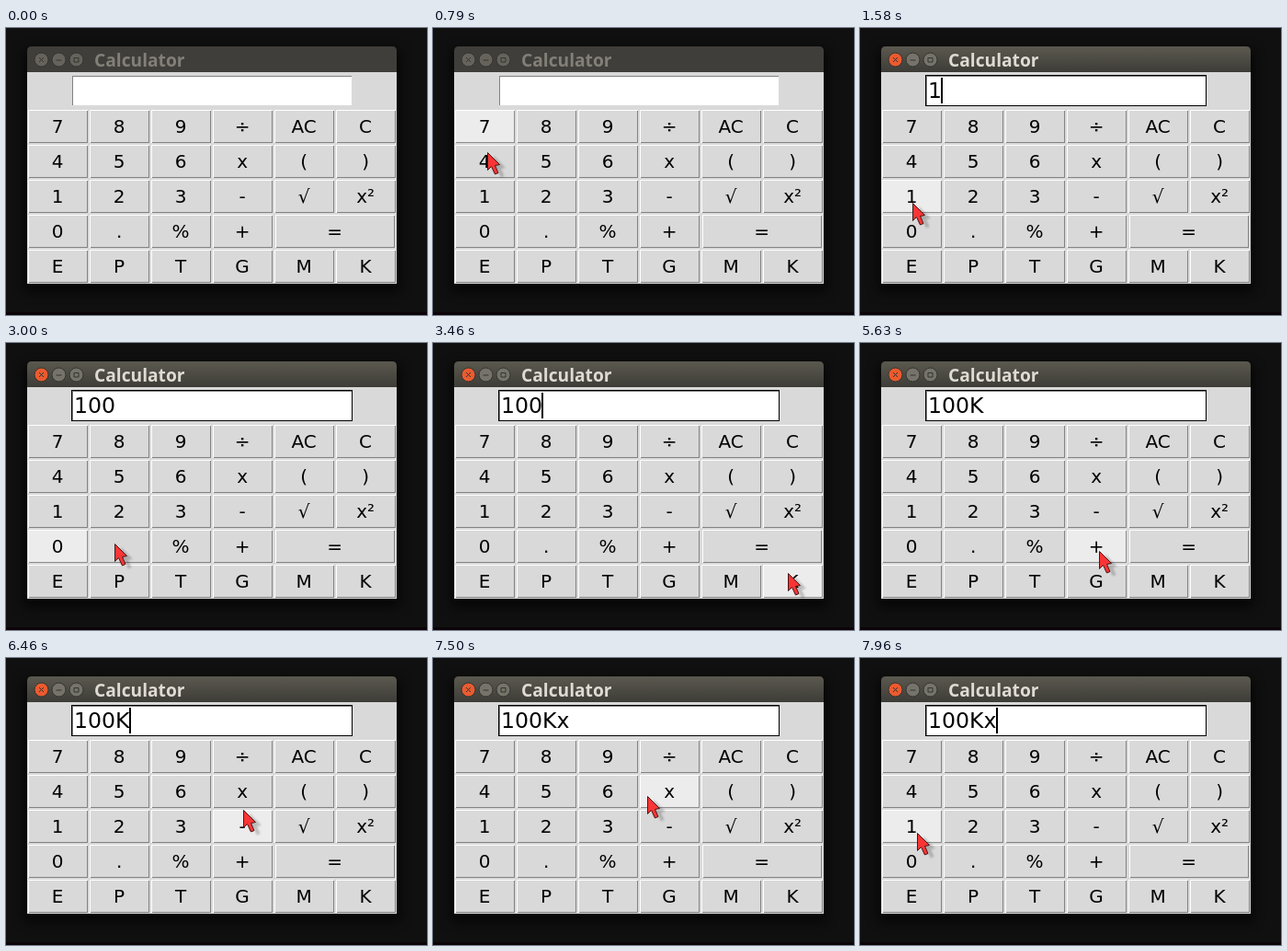
Write an HTML page that moves like this. It is 458 px wide and 312 px high and loops after 8 s.

```html
<!DOCTYPE html>
<html lang="en">
<head>
<meta charset="utf-8">
<title>Calculator</title>
<style>
  html, body { margin: 0; width: 100%; height: 100%; overflow: hidden; background: #101010; }
  svg { display: block; }
  .key { font: 20px "DejaVu Sans", sans-serif; text-anchor: middle; }
  .entry { font: 23.6px "DejaVu Sans", sans-serif; }
  .title { font: 700 19.2px "Open Sans", "Noto Sans", sans-serif; }
</style>
</head>
<body>
<svg id="stage" width="458" height="312" viewBox="0 0 458 312">
  <defs>
    <linearGradient id="bar" x2="0" y2="1">
      <stop offset="0" stop-color="#5b594f"/>
      <stop offset="1" stop-color="#3d3c37"/>
    </linearGradient>
    <filter id="soft" x="-20%" y="-20%" width="140%" height="140%"><feGaussianBlur stdDeviation="7"/></filter>
    <filter id="blur" x="-50%" y="-50%" width="200%" height="200%"><feGaussianBlur stdDeviation="1"/></filter>
    <path id="arrow" d="M.5 .5V19.5L4.5 15.5L8.5 24L12 22.5L8.5 14.5L13.5 13.5Z"/>
  </defs>
  <rect width="458" height="312" fill="#101010"/>
  <rect y="309" width="458" height="3" fill="#0c0308"/>
  <rect x="20" y="24" width="408" height="262" fill="#000" opacity=".75" filter="url(#soft)"/>
  <path id="titleBar" d="M23 48V25Q23 20 28 20H420Q425 20 425 25V48Z"/>
  <g id="controls" stroke="#35342f"></g>
  <text id="title" class="title" x="96" y="42">Calculator</text>
  <rect x="23" y="48" width="402" height="230" fill="#d9d9d9"/>
  <g shape-rendering="crispEdges">
    <rect id="frame" x="71" y="51" width="306" height="34"/>
    <path d="M72 84V52H376V53H73V84Z" fill="#828282"/>
    <rect x="73" y="53" width="303" height="31" fill="#fff"/>
  </g>
  <text id="value" class="entry" x="74" y="76"></text>
  <rect id="caret" y="54" width="2" height="28"/>
  <g id="keys"></g>
  <g id="pointer">
    <use href="#arrow" x="6.5" y="3.5" fill="#000" opacity=".2" filter="url(#blur)"/>
    <use href="#arrow" fill="#fb3535" stroke="#4a1616" stroke-linejoin="round"/>
  </g>
</svg>
<script>
const LOOP = 8000, FOCUS = 1250, HOLD = 130, HOVER_LAG = 60;
const BLINK = { start: 1960, period: 917, off: 300 };
const NS = 'http://www.w3.org/2000/svg';
const $ = id => document.getElementById(id);

function set(el, attrs) {
  for (const name in attrs) el.setAttribute(name, attrs[name]);
}
function add(parent, tag, attrs, text) {
  const el = document.createElementNS(NS, tag);
  set(el, attrs);
  if (text) el.textContent = text;
  parent.appendChild(el);
  return el;
}

// Eased pointer moves: begin, end, target x, target y
const moves = [
  [290, 1000, 57, 178], [1460, 1750, 57, 211], [2813, 3500, 389, 250],
  [3540, 3800, 395, 256], [4580, 5080, 260, 226], [5700, 6080, 268, 208],
  [6340, 6540, 252, 143], [7420, 7800, 86, 206], [7800, 7960, 62, 190]
];
const presses = [[1250, '1'], [1960, '0'], [2710, '0'], [4130, 'K'], [7130, 'x']];
const advance = { K: 16, x: 14 };

function tipAt(t) {
  let x = 66, y = -30;
  for (const [begin, end, toX, toY] of moves) {
    const k = Math.min(1, Math.max(0, (t - begin) / (end - begin)));
    const ease = k * k * (3 - 2 * k);
    x += (toX - x) * ease;
    y += (toY - y) * ease;
  }
  return [x, y];
}

const rows = ['7 8 9 ÷ AC C', '4 5 6 x ( )', '1 2 3 - √ x²', '0 . % + =', 'E P T G M K'];
const keys = rows.flatMap((row, r) => row.split(' ').map((label, c) => {
  const wide = label === '=';
  const x = 24 + 67 * c + (wide ? 1 : 0), y = 89 + 38 * r, w = wide ? 130 : 65, h = 36;
  const g = add($('keys'), 'g', { 'shape-rendering': 'crispEdges' });
  const face = add(g, 'rect', { x, y, width: w, height: h });
  const dark = add(g, 'path', { d: `M${x + 1} ${y + h}v-1h${w - 2}v${2 - h}h1v${h - 1}z` });
  const light = add(g, 'path', { d: `M${x} ${y + h}v${-h}h${w}v1h${1 - w}v${h - 1}z` });
  const text = add(g, 'text', { class: 'key', x: x + w / 2 - .4, y: y + 25 }, label);
  return { label, x, y, w, h, face, dark, light, text };
}));

const glyphs = ['M-2.5 -2.5L2.5 2.5M2.5 -2.5L-2.5 2.5', 'M-3 .5H3', 'M-2.5 -2H2.5V2.5H-2.5Z'];
const controls = glyphs.map((d, i) => {
  const g = add($('controls'), 'g', { transform: `translate(${38.5 + 19 * i} 34.5)` });
  const disc = add(g, 'circle', { r: 7.5 });
  add(g, 'path', { d, fill: 'none' });
  return disc;
});

function drawWindow(focused) {
  set($('titleBar'), { fill: focused ? 'url(#bar)' : '#403e3a' });
  set($('title'), { fill: focused ? '#dfdbd2' : '#827f78' });
  set($('frame'), { fill: focused ? '#000' : '#d9d9d9' });
  controls.forEach((disc, i) => set(disc, { fill: !focused ? '#65635c' : i ? '#75736a' : '#ea5b30' }));
}

function drawEntry(t, focused) {
  const typed = presses.filter(([at]) => t >= at + HOLD).map(([, label]) => label);
  const { start, period, off } = BLINK;
  const hidden = (t - start + LOOP * period) % period < off;
  $('value').textContent = typed.join('');
  set($('caret'), {
    x: 73 + typed.reduce((sum, c) => sum + (advance[c] || 15), 0),
    opacity: focused && !hidden ? 1 : 0
  });
}

function drawKeys(t) {
  const [x, y] = tipAt(t - HOVER_LAG);
  const down = presses.find(([at]) => t >= at && t < at + HOLD);
  for (const key of keys) {
    const over = x >= key.x && x < key.x + key.w && y >= key.y && y < key.y + key.h;
    const sunken = over && down && down[1] === key.label;
    const shade = over ? '#8d8d8d' : '#828282';
    set(key.face, { fill: over ? '#ececec' : '#d9d9d9' });
    set(key.dark, { fill: sunken ? '#fff' : shade });
    set(key.light, { fill: sunken ? shade : '#fff' });
    set(key.text, { transform: sunken ? 'translate(2 2)' : '' });
  }
}

function render(t) {
  const focused = t >= FOCUS;
  drawWindow(focused);
  drawEntry(t, focused);
  drawKeys(t);
  const [x, y] = tipAt(t).map(Math.round);
  set($('pointer'), { transform: `translate(${x} ${y})` });
}

const start = performance.now();
function tick() {
  render((performance.now() - start) % LOOP);
  requestAnimationFrame(tick);
}
tick();
</script>
</body>
</html>
```
